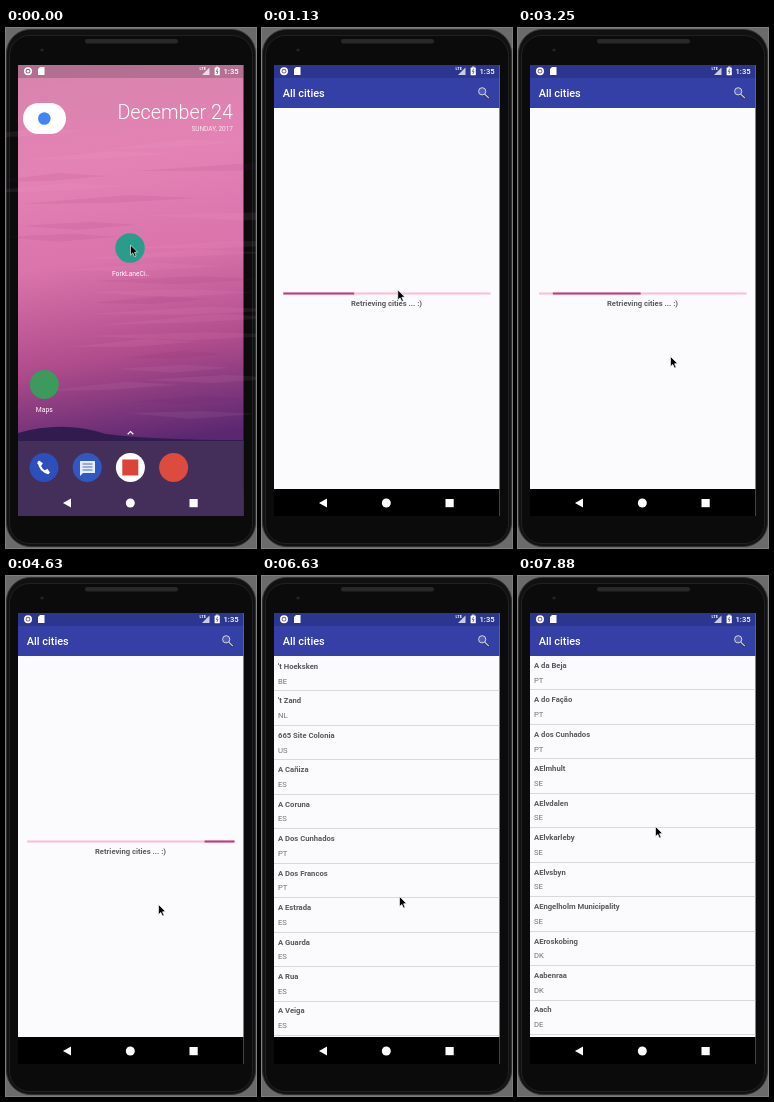
Recreate the animation shown at these times as an HTML page with a canvas. Size 250 by 520 pixels, loop 8000 ms.

```html
<!DOCTYPE html>
<html lang="en">
<head>
<meta charset="utf-8">
<title>City list</title>
<style>
  html, body { margin: 0; width: 100%; height: 100%; overflow: hidden; background: #6b6b6b; }
  canvas { display: block; width: 250px; height: 520px; }
</style>
</head>
<body>
<canvas id="stage"></canvas>
<script>
const canvas = document.getElementById('stage');
const ctx = canvas.getContext('2d');
const dpr = window.devicePixelRatio || 1;
canvas.width = 250 * dpr;
canvas.height = 520 * dpr;

const LOOP = 8000;
const LEFT = 12, TOP = 37, WIDTH = 225.5, BOTTOM = 488;
const BAR_END = 80, NAV = 461, ROW = 34.45;
const LAUNCH = 630, OPEN = 880, READY = 1000, STALL = 5880, LIST = 6130;
const WHITE = '#fff', PAPER = '#fbfafc', DOCK = '#432f59';

const CITIES = [
  "'t Hoeksken BE", "'t Zand NL", '665 Site Colonia US', 'A Cañiza ES',
  'A Coruna ES', 'A Dos Cunhados PT', 'A Dos Francos PT', 'A Estrada ES',
  'A Guarda ES', 'A Rua ES', 'A Veiga ES', 'A Ver-O-Mar PT', 'A da Beja PT',
  'A do Fação PT', 'A dos Cunhados PT', 'AElmhult SE', 'AElvdalen SE',
  'AElvkarleby SE', 'AElvsbyn SE', 'AEngelholm Municipality SE',
  'AEroskobing DK', 'Aabenraa DK', 'Aach DE'
];

const ramp = (t, from, to) => Math.min(1, Math.max(0, (t - from) / (to - from)));
const smooth = u => u * u * (3 - 2 * u);
const easeOut = (u, power) => 1 - Math.pow(1 - u, power);

function seeded(seed) {
  return () => (seed = (seed * 16807) % 2147483647) / 2147483647;
}

function rect(x, y, w, h, color) {
  ctx.fillStyle = color;
  ctx.fillRect(x, y, w, h);
}

// A band across the whole screen.
const band = (y0, y1, color) => rect(LEFT, y0, WIDTH, y1 - y0, color);

function disc(x, y, r, color) {
  ctx.fillStyle = color;
  ctx.beginPath();
  ctx.arc(x, y, r, 0, Math.PI * 2);
  ctx.fill();
}

function round(x, y, w, h, r, color) {
  ctx.fillStyle = color;
  ctx.beginPath();
  ctx.roundRect(x, y, w, h, r);
  ctx.fill();
}

// Outlines the latest path.
function outline(color, width) {
  ctx.strokeStyle = color;
  ctx.lineWidth = width;
  ctx.stroke();
}

function trace(points) {
  ctx.beginPath();
  points.forEach(([x, y]) => ctx.lineTo(x, y));
}

function shape(points, color) {
  trace(points);
  ctx.closePath();
  ctx.fillStyle = color;
  ctx.fill();
}

function line(points, color, width) {
  trace(points);
  outline(color, width);
}

function text(str, x, y, size, weight, color, align = 'left') {
  ctx.font = `${weight} ${size}px Roboto, "Noto Sans", sans-serif`;
  ctx.textAlign = align;
  ctx.fillStyle = color;
  ctx.fillText(str, x, y);
}

function drawPhone() {
  rect(0, 0, 250, 520, '#6b6b6b');
  round(0.5, 1.5, 249, 517, 24, '#111112');
  outline('#303032', 1);
  round(3.5, 7.5, 243, 508, 20, '#0b0b0c');
  outline('#222224', 1);
  round(79, 11, 93, 4.5, 2.2, '#29292b');
  disc(36, 22, 1.6, '#20263a');
}

function drawStatus() {
  disc(22, 43.2, 4, WHITE);
  disc(22, 43.2, 2.4, '#8a6a90');
  disc(22, 43.2, 1.3, WHITE);
  shape([[34, 39], [38.5, 39], [38.5, 47], [32, 47], [32, 41]], WHITE);
  text('LTE', 193.5, 42.4, 4, 700, WHITE);
  shape([[203.5, 39.5], [203.5, 47], [196, 47]], 'rgba(255,255,255,.75)');
  rect(210, 38.6, 2.4, 1, WHITE);
  round(208.6, 39.4, 5.2, 7.9, 0.6, WHITE);
  line([[211.6, 40.8], [210.4, 43.6], [212, 43.6], [210.8, 46]], '#555', 0.8);
  text('1:35', 217.5, 46.2, 7.7, 500, WHITE);
}

function drawNav(color) {
  band(NAV, BOTTOM, color);
  shape([[57, 475], [65, 470.5], [65, 479.5]], WHITE);
  disc(124.3, 475, 4.5, WHITE);
  rect(183.5, 471, 8.2, 8.2, WHITE);
}

function drawWallpaper() {
  // The sky darkens downwards and a little to the right.
  const sky = ctx.createLinearGradient(90, 40, 150, 416);
  const tones = ['#d884ad', '#e482b5', '#da74ab', '#b24d8d', '#5a2770'];
  tones.forEach((tone, i) => sky.addColorStop(i / (tones.length - 1), tone));
  band(TOP, BOTTOM, sky);

  const rnd = seeded(24);
  for (let i = 0; i < 26; i++) {
    const x = rnd() * 180 - 40, y = 110 + i * 11;
    const w = 100 + rnd() * 120, tilt = rnd() * 10 - 8;
    shape([[x, y], [x + w * 0.6, y + tilt - 3], [x + w, y + tilt], [x + w * 0.5, y + tilt + 5]],
      rnd() < 0.5 ? 'rgba(255,180,215,.07)' : 'rgba(110,20,90,.07)');
  }
  ctx.fillStyle = '#311c50';
  ctx.beginPath();
  ctx.moveTo(LEFT, 405);
  ctx.quadraticCurveTo(57, 392, 100, 406);
  ctx.quadraticCurveTo(150, 412, 238, 412);
  ctx.lineTo(238, 414);
  ctx.lineTo(LEFT, 414);
  ctx.fill();
  band(TOP, 50, 'rgba(70,60,70,.27)');
}

function drawHome() {
  drawWallpaper();
  band(413, BOTTOM, DOCK);
  round(17, 75, 43, 31, 15.5, WHITE);
  disc(38.3, 90.5, 6.3, '#4285f4');
  text('December 24', 227, 90.7, 19.75, 300, WHITE, 'right');
  text('SUNDAY, 2017', 227, 103.3, 6.5, 400, 'rgba(255,255,255,.8)', 'right');
  disc(124, 220, 14.7, '#2a9c8b');
  text('ForkLaneCi..', 124.5, 248, 6.7, 400, WHITE, 'center');
  disc(38.3, 356.5, 14.5, '#3c9a5c');
  text('Maps', 38.3, 384.2, 6.8, 400, WHITE, 'center');
  line([[121.7, 406.3], [124.5, 403.6], [127.3, 406.3]], WHITE, 1.2);

  ['#2b4fbb', '#3157c0', WHITE, '#dd4b3e'].forEach((color, i) => disc(38 + i * 43.2, 439.5, 14.5, color));
  // Handset
  ctx.beginPath();
  ctx.moveTo(32.8, 433.5);
  ctx.quadraticCurveTo(33.8, 443.6, 43.2, 445);
  outline(WHITE, 2.4);
  line([[32, 434], [36, 436.6]], WHITE, 3.4);
  line([[40, 441.6], [42.6, 445.4]], WHITE, 3.4);
  // Speech bubble
  shape([[74, 433], [89, 433], [89, 445], [77, 445], [74, 448]], '#e9eefc');
  for (let y = 436; y < 444; y += 3) rect(76.5, y - 0.5, 10, 1, '#4a6bc8');
  rect(116.3, 431.5, 16, 16, '#db4437');
  drawNav(DOCK);
}

function drawAppBar() {
  band(50, BAR_END, '#3540a7');
  text('All cities', 20.8, 69.4, 10.9, 500, WHITE);
  line([[222.6, 66.2], [227, 70.4]], '#22265c', 2.6);
  line([[222.8, 66.2], [226.8, 70]], '#c9c9d2', 1.3);
  disc(220.2, 63.3, 3.6, 'rgba(190,200,235,.2)');
  outline('#d6d6dc', 1);
}

function drawLoading(t) {
  const x = 21, y = 264.5, w = 207.5;
  const p = (Math.min(t, STALL) - 850) / 2000 % 1;
  // Two segments: each has its own rule for the tail and the head.
  const segments = [
    [1.75 * Math.pow(p, 1.5) - 0.09, 2.45 * p],
    [1.06 * easeOut(ramp(p, 0.69, 1), 1.8) - 0.04, 1.08 * easeOut(ramp(p, 0.565, 1), 2.5)]
  ];
  rect(x, y, w, 2, '#f9bfd5');
  for (const [tail, head] of segments) {
    const from = ramp(tail, 0, 1), to = ramp(head, 0, 1);
    if (to > from) rect(x + from * w, y, (to - from) * w, 2, '#bd3a80');
  }
  text('Retrieving cities ... :)', 124.5, 278, 7.66, 700, '#5c5b5e', 'center');
}

function drawList(t) {
  const offset = 354 * smooth(ramp(t, 6630, 7250)) + 60.4 * ramp(t, 7500, 7880);
  ctx.save();
  ctx.beginPath();
  ctx.rect(LEFT, BAR_END, WIDTH, NAV - BAR_END);
  ctx.clip();
  CITIES.forEach((city, i) => {
    const top = BAR_END + i * ROW - offset;
    text(city.slice(0, -3), 16, top + 12.9, 7.66, 700, '#59585b');
    text(city.slice(-2), 16, top + 27.6, 7.66, 400, '#737276');
    band(Math.round(top + ROW), Math.round(top + ROW) + 1, '#d9d8da');
  });
  ctx.restore();
}

function drawApp(t) {
  band(TOP, BOTTOM, PAPER);
  band(TOP, 50, '#2c368f');
  if (t >= READY) {
    if (t < LIST) drawLoading(t); else drawList(t);
    drawAppBar();
  }
  drawNav('#000');
}

function drawMouse(t) {
  const walk = ramp(t, OPEN, 1500), back = ramp(t, LIST, 6630);
  const flick = ramp(t, 6630, 7250), drag = ramp(t, 7250, 7880);
  ctx.save();
  ctx.translate(124.5 + 28 * walk - 15 * back,
    217 + 111.5 * walk - 8 * back + 16 * flick - 85 * Math.sin(Math.PI * flick) - 86 * drag);
  shape([[0, 0], [0, 10], [2.3, 7.9], [4, 11.6], [5.6, 10.9], [4, 7.3], [7, 7]], '#000');
  outline('rgba(255,255,255,.9)', 0.7);
  ctx.restore();
}

function draw(t) {
  ctx.setTransform(dpr, 0, 0, dpr, 0, 0);
  drawPhone();
  if (t < OPEN) {
    drawHome();
    if (t >= 750) band(61.5, 450.5, PAPER);
    else if (t >= LAUNCH) rect(30, 140, 189, 200, PAPER);
  } else {
    drawApp(t);
  }
  drawStatus();
  drawMouse(t);
}

// The picture changes eight times a second, on a 10 ms grid.
function snap(t) {
  const start = n => Math.ceil(n * 12.5) * 10;
  const n = Math.floor(t / 125);
  return start(n) > t ? start(n - 1) : start(n);
}

const begin = performance.now();
function tick() {
  draw(snap((performance.now() - begin) % LOOP));
  requestAnimationFrame(tick);
}
tick();
</script>
</body>
</html>
```
